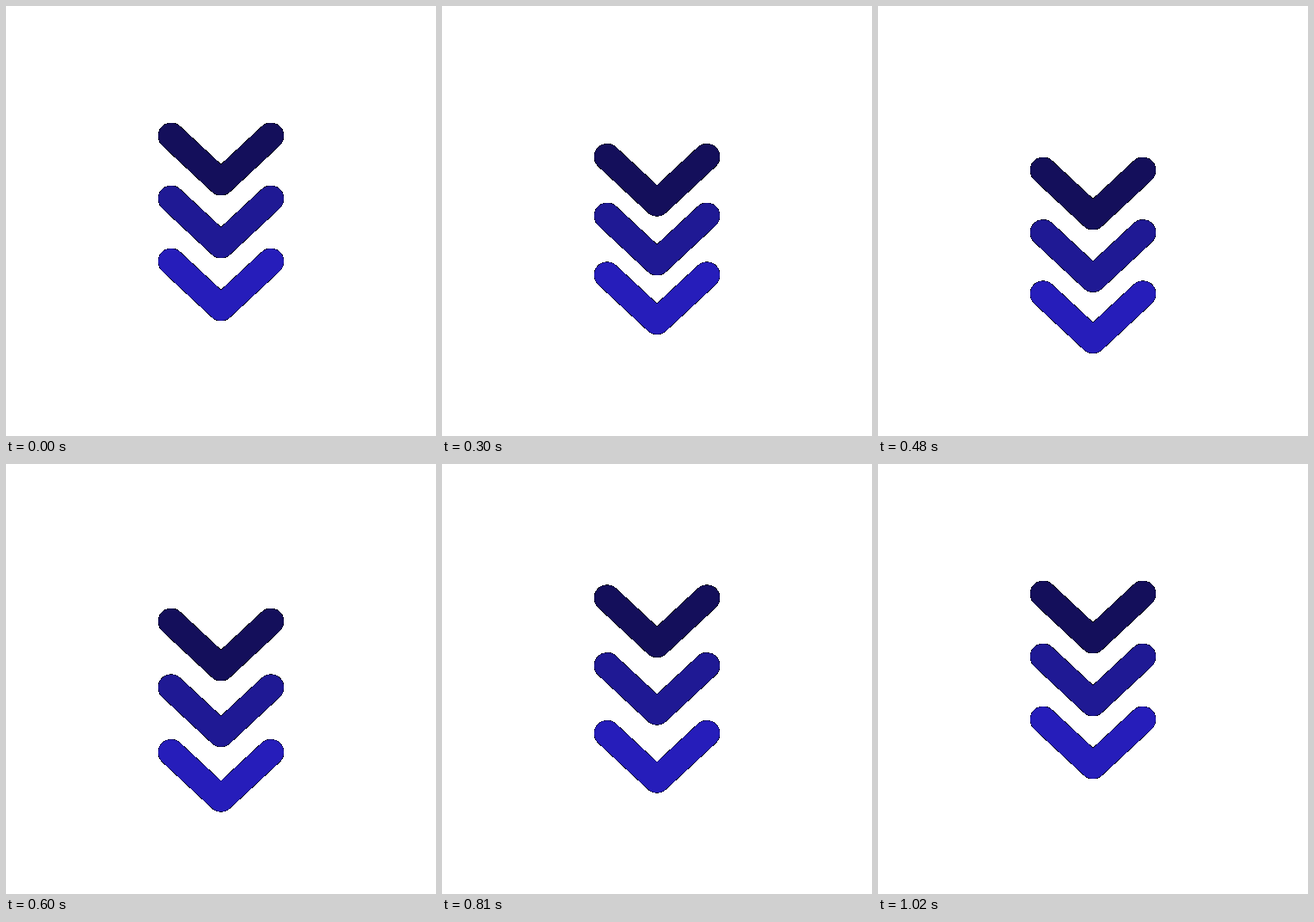
These frames come from a looping animation (500x500 px, 1050 ms). An HTML page:

```html
<!DOCTYPE html>
<html lang="en">
<head>
<meta charset="utf-8">
<title>Scroll down chevrons</title>
<style>
  html, body { margin: 0; width: 100%; height: 100%; overflow: hidden; background: #fff; }
  svg { display: block; width: 100%; height: 100%; }
  path { fill: none; stroke-width: 30; stroke-linecap: round; stroke-linejoin: round; }
</style>
</head>
<body>
<svg viewBox="0 0 500 500">
  <!-- Hard silhouette: every partly covered pixel is blended with black -->
  <filter id="hardEdge" filterUnits="userSpaceOnUse" x="0" y="0" width="500" height="500"
          color-interpolation-filters="sRGB">
    <feColorMatrix in="SourceGraphic" values="0 0 0 0 0  0 0 0 0 0  0 0 0 0 0  0 0 0 255 -5" result="matte"/>
    <feMerge>
      <feMergeNode in="matte"/>
      <feMergeNode in="SourceGraphic"/>
    </feMerge>
  </filter>
  <g id="chevrons" filter="url(#hardEdge)"></g>
</svg>
<script>
const TICK = 30;
const TICKS = 35;
const TRAVEL = 40;

// start, peak and end are counted in ticks
const chevrons = [
  { y: 151, color: '#140f5b', start: 2, peak: 16, end: 30 },
  { y: 224, color: '#1f1994', start: 3, peak: 17, end: 32 },
  { y: 297, color: '#261dba', start: 4, peak: 18, end: 34 }
];

const group = document.getElementById('chevrons');
for (const c of chevrons) {
  c.path = document.createElementNS('http://www.w3.org/2000/svg', 'path');
  c.path.setAttribute('d', `M192 ${c.y}l58 54l58 -54`);
  c.path.setAttribute('stroke', c.color);
  group.append(c.path);
}

function smoothstep(from, to, x) {
  const u = Math.min(1, Math.max(0, (x - from) / (to - from)));
  return u * u * (3 - 2 * u);
}

function draw(ms) {
  const tick = Math.floor(ms / TICK) % TICKS;
  for (const { path, start, peak, end } of chevrons) {
    const drop = TRAVEL * (smoothstep(start, peak, tick) - smoothstep(peak, end, tick));
    path.setAttribute('transform', `translate(0 ${drop.toFixed(3)})`);
  }
}

const begin = performance.now();
function loop() {
  draw(performance.now() - begin);
  requestAnimationFrame(loop);
}
loop();
</script>
</body>
</html>
```
